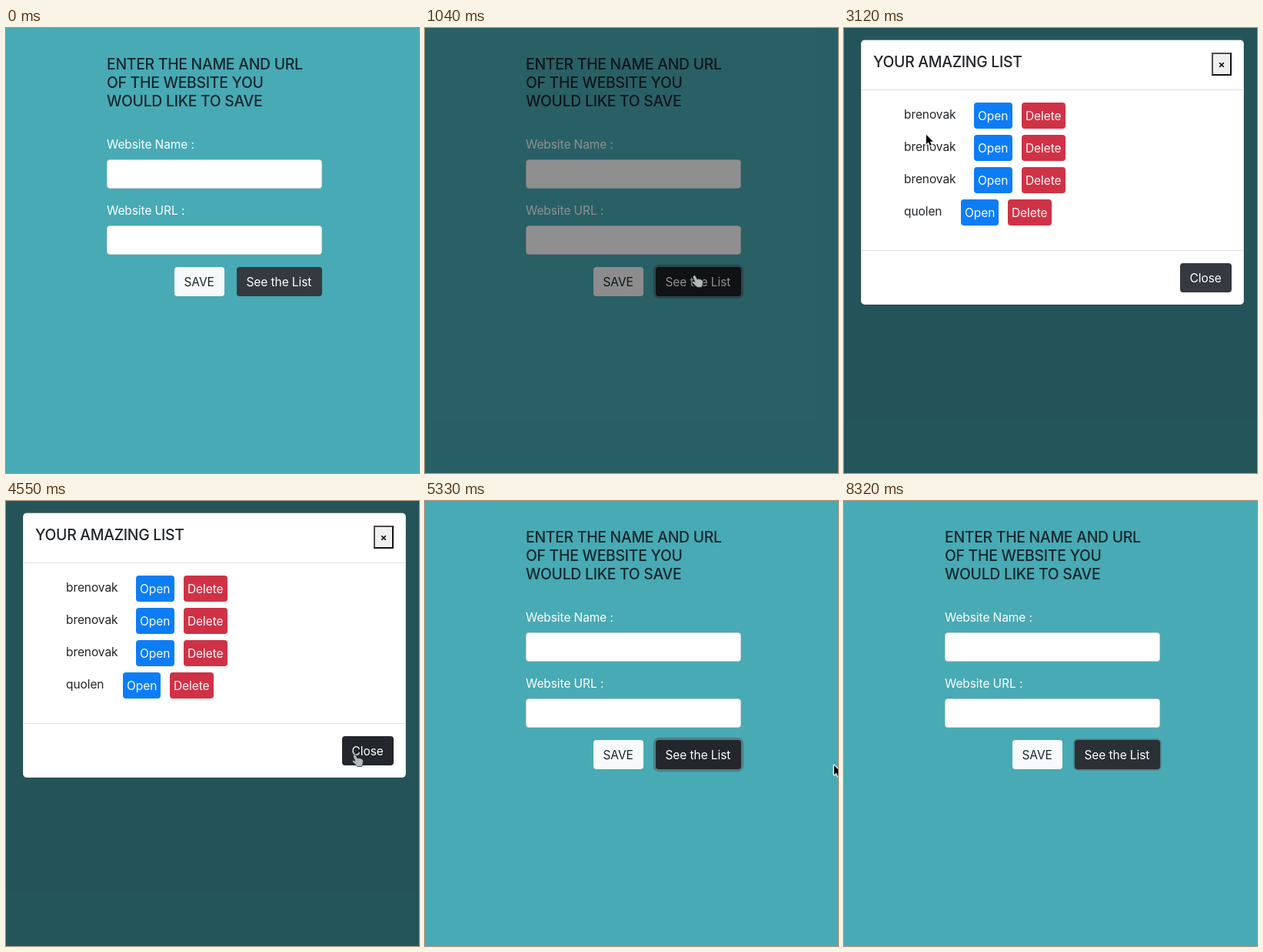
Write an HTML page that moves like this. It is 537x579 px and loops after 8.45 s.

```html
<!DOCTYPE html>
<html lang="en">
<head>
<meta charset="utf-8">
<title>Website list</title>
<style>
html, body { margin: 0; width: 100%; height: 100%; overflow: hidden; background: #48aab4; }
svg { display: block; }
text { font: 400 15.5px Inter, Roboto, sans-serif; letter-spacing: -.08px; font-optical-sizing: none; white-space: pre; }
.title { font-size: 19.4px; font-weight: 500; letter-spacing: -.28px; }
</style>
</head>
<body>
<svg id="stage" width="537" height="579" viewBox="0 0 537 579"></svg>
<script>
const LOOP = 8450, STEP = 130;
const PRESS = 908, OPEN = 1060, CLOSE = 4750, CLOSED = 5052, BLUR = 8250;
const TEAL = '#48aab4', INK = '#212529', DEEP = '#15272c';

// Pointer stops: time, x, y
const stops = [
  [130, 560, 440], [780, 349, 319], [2080, 349, 319], [2990, 107, 139],
  [3510, 107, 139], [4420, 452, 327], [5070, 452, 327], [5460, 560, 350]
];
const rows = ['brenovak', 'brenovak', 'brenovak', 'quolen'];

const ramp = (t, start, length) => Math.max(0, Math.min(1, (t - start) / length));
const text = (x, y, s, fill = INK, cls = '') =>
  `<text x="${x}" y="${y}" fill="${fill}" class="${cls}">${s}</text>`;
const rect = (x, y, w, h, fill, r = 4, extra = '') =>
  `<rect x="${x}" y="${y}" width="${w}" height="${h}" rx="${r}" fill="${fill}" ${extra}/>`;
const line = y => rect(22, y, 498, 1, '#dee2e6', 0);
const dark = k => `rgb(${52 - 17 * k},${58 - 19 * k},${64 - 21 * k})`;
const inside = (p, x, y, w, h) => p && p.x >= x && p.x < x + w && p.y >= y && p.y < y + h;

function pointerAt(t) {
  const i = stops.findIndex(s => s[0] > t);
  if (i < 1) return null;
  const [t0, x0, y0] = stops[i - 1], [t1, x1, y1] = stops[i];
  const p = (t - t0) / (t1 - t0), e = p * p * (3 - 2 * p);
  return { x: x0 + (x1 - x0) * e, y: y0 + (y1 - y0) * e, hand: false };
}

function form(t, pointer) {
  const over = t < OPEN && inside(pointer, 300, 311, 111, 38);
  if (over) pointer.hand = true;
  const focus = t < 4000
    ? ramp(t, 780, 130) * (1 - ramp(t, 1360, 150))
    : ramp(t, 5200, 130) * (1 - ramp(t, BLUR, 150));
  const pressed = t >= 900 && t < 1300;
  const shade = pressed ? 1.35 : Math.max(focus, over ? 1 : 0);
  const ring = 3.2 * focus;
  const field = y => rect(131.5, y + .5, 279, 37, '#fff', 3.5, 'stroke="#ced4da"');
  return ['ENTER THE NAME AND URL', 'OF THE WEBSITE YOU', 'WOULD LIKE TO SAVE']
      .map((s, i) => text(131, 54 + 24 * i, s, DEEP, 'title')).join('')
    + text(131, 157, 'Website Name :', '#fff') + field(171)
    + text(131, 243, 'Website URL :', '#fff') + field(257)
    + rect(219, 311, 65, 38, '#f8f9fa') + text(231.5, 336, 'SAVE', DEEP)
    + rect(300 - ring, 311 - ring, 111 + 2 * ring, 38 + 2 * ring, 'rgba(82,88,93,.5)', 4 + ring)
    + rect(300, 311, 111, 38, dark(shade)) + text(312.5, 336, 'See the List', '#fff');
}

function button(pointer, x, y, w, h, label, pad, color, hover) {
  const over = inside(pointer, x, y, w, h);
  if (over) pointer.hand = true;
  return rect(x, y, w, h, over ? hover : color) + text(x + pad, y + h / 2 + 6, label, '#fff');
}

function modal(t, pointer) {
  const shown = ramp(t, OPEN, 150) * (1 - ramp(t, CLOSE, 150));
  if (!shown) return '';
  const slide = -50 * ((1 - ramp(t, OPEN, 300)) ** 2 + ramp(t, CLOSE, 300));
  const list = rows.map((name, i) => {
    const y = 97 + 42 * i, x = i < 3 ? 169 : 152, w = i < 3 ? 50 : 49;
    return text(78, y + 21, name)
      + button(pointer, x, y, w, 34, 'Open', 5, '#0d7df6', '#0069d9')
      + button(pointer, x + w + 12, y, 57, 34, 'Delete', 5, '#cf3246', '#bd2434');
  }).join('');
  return `<g opacity="${shown}" transform="translate(0 ${slide})">`
    + rect(22, 15.5, 498, 344.5, '#fff', 4.8, 'stroke="#000" stroke-opacity=".2"')
    + text(38, 51, 'YOUR AMAZING LIST', INK, 'title')
    + rect(479, 33, 24, 28, '#efefef', 0, 'stroke="#111" stroke-width="2"')
    + '<path d="M479 61V33H503" fill="none" stroke="#4c4c4c" stroke-width="2"/>'
    + '<path d="M488.2 45.2l5.6 5.6m0-5.6l-5.6 5.6" stroke="#000" stroke-width="1.6"/>'
    + line(80) + list + line(289)
    + button(pointer, 437, 306, 67, 38, 'Close', 12.5, dark(0), dark(1))
    + '</g>';
}

function cursor(p) {
  if (!p) return '';
  const shape = p.hand
    ? '<path transform="translate(-1 1)" d="M1 2.5Q3 1 4 3L6 7Q8 5.5 9 7Q11 6 11.5 8Q13.5 7.5 13.5 10L13 14L11.5 17.5H6L2 13.5L-1 11Q-1 9 1.5 9.5L3 10.5L.5 5Q0 3.5 1 2.5Z" fill="#b4baba" stroke="#222" stroke-width=".8"/>'
    : '<path d="M0 0V12L2.8 9.4L4.8 14L6.8 13.1L4.9 8.7H8.6Z" fill="#000" stroke="#e4e8e8" stroke-width="3" stroke-linejoin="round" paint-order="stroke"/>';
  return `<g transform="translate(${p.x} ${p.y})">${shape}</g>`;
}

function render(t) {
  const pointer = pointerAt(t);
  const dim = .5 * ramp(t, PRESS, 150) * (1 - ramp(t, CLOSED, 148));
  return rect(0, 0, 537, 579, TEAL, 0)
    + form(t, pointer)
    + rect(0, 0, 537, 579, `rgba(0,0,0,${dim})`, 0)
    + modal(t, pointer)
    + cursor(pointer);
}

const stage = document.getElementById('stage');
const start = performance.now();
let last = -1;
function tick() {
  const t = Math.floor((performance.now() - start) % LOOP / STEP) * STEP;
  if (t !== last) stage.innerHTML = render(last = t);
  requestAnimationFrame(tick);
}
tick();
</script>
</body>
</html>
```
